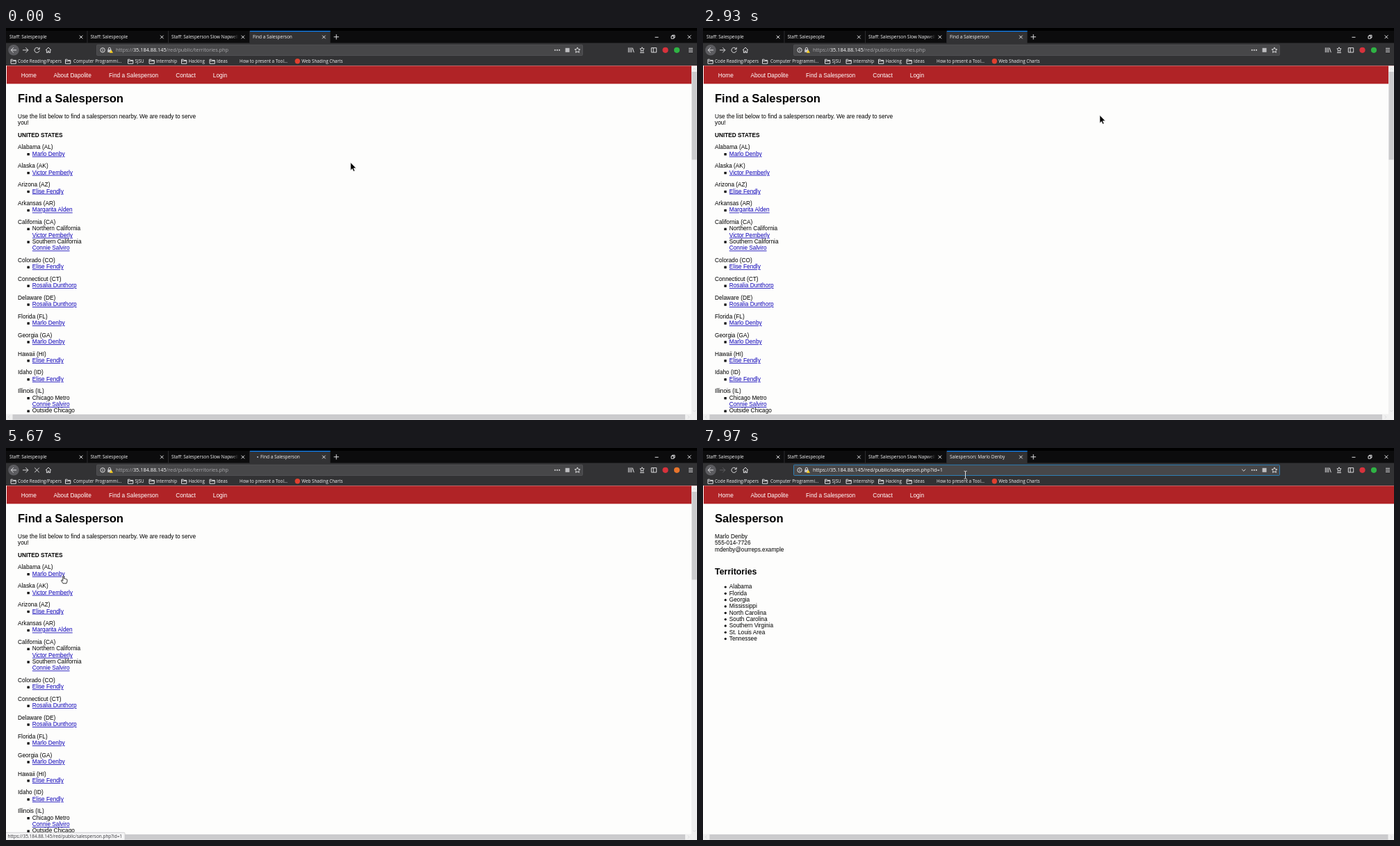
An HTML page that plays this animation: 994 by 564 pixels, repeating every 8000 ms.

```html
<!DOCTYPE html>
<html lang="en">
<head>
<meta charset="utf-8">
<title>Find a Salesperson</title>
<style>
html, body { margin: 0; width: 100%; height: 100%; overflow: hidden; background: #000; }
svg { display: block; width: 100vw; height: 100vh; }
text { white-space: pre; }
.page { font-family: "Liberation Sans", Arial, sans-serif; font-size: 8.28px; }
.ui { font-family: "Open Sans", "Noto Sans", sans-serif; font-size: 6.5px; fill: #f4f4f5; }
.link { fill: #0c00b8; text-decoration: underline; }
.bold { font-weight: bold; }
.h1 { font-weight: bold; font-size: 16.57px; }
.h2 { font-weight: bold; font-size: 12.42px; }
.line { fill: none; stroke: #dcdcde; stroke-width: 1; }
</style>
</head>
<body>
<svg id="stage" viewBox="0 0 994 564" preserveAspectRatio="none">
  <defs>
    <linearGradient id="fade" gradientUnits="userSpaceOnUse" x1="322" x2="335" y1="0" y2="0">
      <stop offset="0" stop-color="#f4f4f5"/>
      <stop offset="1" stop-color="#f4f4f5" stop-opacity="0"/>
    </linearGradient>
    <clipPath id="view"><rect y="54" width="994" height="501.5"/></clipPath>
  </defs>
</svg>
<script>
const NS = 'http://www.w3.org/2000/svg';
const LOOP = 8000;
const HOVER = 4480, CLICK = 5450, LOADED = 5760, SETTLED = 6080;
const IN_BAR = 6300, FOCUS = 6500, CARET = 7050, BLINK = 530;
const LINE = 9.32, GAP = 8.28;

const stage = document.getElementById('stage');

function add(parent, tag, attrs = {}, text) {
  const node = document.createElementNS(NS, tag);
  for (const key in attrs) node.setAttribute(key, attrs[key]);
  if (text !== undefined) node.textContent = text;
  parent.appendChild(node);
  return node;
}
const group = (parent, attrs) => add(parent, 'g', attrs);
const rect = (parent, x, y, width, height, fill) => add(parent, 'rect', { x, y, width, height, fill });
const dot = (parent, cx, cy, r, fill) => add(parent, 'circle', { cx, cy, r, fill });
const path = (parent, d, attrs) => add(parent, 'path', { d, class: 'line', ...attrs });
const label = (parent, x, y, text, attrs) => add(parent, 'text', { x, y, ...attrs }, text);
const show = (node, on) => node.setAttribute('visibility', on ? 'visible' : 'hidden');

/* browser frame */
rect(stage, 0, 0, 994, 564, '#000');
rect(stage, 0, 4, 994, 18, '#0c0c0d');
rect(stage, 0, 21.5, 994, 33, '#323234');
const ui = group(stage, { class: 'ui' });
const tabHover = rect(ui, 234, 4, 116.5, 17.5, '#2a2a2d');
rect(ui, 351, 4, 115.5, 18, '#323234');
rect(ui, 351, 4, 115.5, 1.2, '#0a84ff');
for (const x of [117, 233.6, 350.5]) rect(ui, x - .4, 4, .7, 17.5, '#38383d');
label(ui, 5, 15.4, 'Staff: Salespeople');
label(ui, 121.5, 15.4, 'Staff: Salespeople');
label(ui, 238, 15.4, 'Staff: Salesperson Slow Napwell', { fill: 'url(#fade)' });
const title = label(ui, 355, 15.4, '');
const throbber = dot(ui, 362, 13, .9, '#c8d4e4');

const cross = (x, y, r, attrs) => path(ui, `M${x - r} ${y - r}l${2 * r} ${2 * r}m0 ${-2 * r}l${-2 * r} ${2 * r}`, attrs);
for (const x of [108, 224.3, 340.8, 457.3]) cross(x, 13, 2.3);
path(ui, 'M471.5 12.8h7.4M475.2 9.1v7.4');
path(ui, 'M933.5 13.3h5', { 'stroke-width': .8 });
path(ui, 'M957 11.6h3.6v3.6H957zM958.3 11.4v-1.1h3.7V14h-1.2', { 'stroke-width': .7 });
cross(983, 12.8, 2.4, { 'stroke-width': .8 });

/* toolbar */
dot(ui, 11, 31.8, 7.8, '#5c5c60');
path(ui, 'M15 31.8H7.3M10.8 28.2L7.2 31.8l3.6 3.6', { 'stroke-width': 1.1 });
const forward = path(ui, 'M24 31.8h7.7M28.3 28.2l3.6 3.6-3.6 3.6', { 'stroke-width': 1.1 });
const reload = path(ui, 'M47.6 29.9a3.6 3.6 0 1 0 .5 2.6M48.2 27.8v2.7h-2.7', { 'stroke-width': 1.1 });
const stop = cross(44.5, 31.8, 3.3, { 'stroke-width': 1.1 });
const halfStop = path(ui, 'M41.5 28.8l6 6', { stroke: '#77777a', opacity: .8 });
path(ui, 'M57 32l4-4 4 4M58.4 31.5v4h1.9v-2.4h1.5v2.4h1.9v-4', { 'stroke-width': .9 });

const bar = add(ui, 'rect', { x: 130.5, y: 24.3, width: 699, height: 15.2, rx: 1, fill: '#474749' });
add(ui, 'circle', { cx: 139, cy: 31.8, r: 3.2, class: 'line', 'stroke-width': .7 });
path(ui, 'M139 31.2v2.2M139 29.8v.8', { 'stroke-width': .8 });
rect(ui, 146.2, 31, 5.4, 4, '#c4c4c6');
path(ui, 'M147.3 31v-1.2a1.6 1.6 0 0 1 3.2 0V31', { stroke: '#c4c4c6', 'stroke-width': .9 });
add(ui, 'path', { d: 'M151.4 31.4l2.6 4.3h-5.2z', fill: '#ffd21f' });

const marked = rect(ui, 158, 27, 187.5, 10, '#0a78d7');
const url = label(ui, 158, 34.4, '', { style: 'font-size:7.32px' });
const scheme = add(url, 'tspan', {}, 'https://');
add(url, 'tspan', { fill: '#f9f9fa' }, '35.184.88.145');
const route = add(url, 'tspan');
const caret = rect(ui, 346, 27.5, .7, 9, '#f9f9fa');

const chevron = path(ui, 'M775.2 30.6l2.6 2.6 2.6-2.6', { 'stroke-width': 1.1 });
for (const x of [789.8, 792.9, 796]) dot(ui, x, 31.8, 1.05, '#dcdcde');
rect(ui, 804.6, 28.8, 6, 6, '#bdbdc0');

function star(cx, cy, r) {
  let d = '';
  for (let i = 0; i < 10; i++) {
    const a = Math.PI * (i / 5 - .5), q = i % 2 ? r * .48 : r;
    d += `${i ? 'L' : 'M'}${cx + q * Math.cos(a)} ${cy + q * Math.sin(a)}`;
  }
  path(ui, d + 'Z', { 'stroke-width': .8 });
}
star(822, 32, 4.1);
star(915, 31, 3.3);
path(ui, 'M895.4 28.2v7M897.6 28.2v7M899.8 28.2v7M901.3 28.6l2 6.6', { 'stroke-width': .9 });
path(ui, 'M912 35.5h6', { 'stroke-width': .9 });
path(ui, 'M928.3 28.6h7.4v6.4h-7.4zM931.2 28.6V35', { 'stroke-width': .9 });
dot(ui, 948.5, 31.8, 4.1, '#d8323c');
const badge = dot(ui, 965, 31.8, 4.1, '#2fb344');
path(ui, 'M982 29.3h6M982 31.8h6M982 34.3h6', { 'stroke-width': .9 });

/* bookmarks */
const marks = [
  [17, 'Code Reading/Papers'], [97, 'Computer Programmi...'], [185.5, 'SJSU'],
  [216, 'Internship'], [262.5, 'Hacking'], [303, 'Ideas']
];
const small = { style: 'font-size:6.3px' };
for (const [x, name] of marks) {
  const left = name.startsWith('Comp') ? x - 11.5 : x - 10;
  path(ui, `M${left} 45.2h2.6l1 1.2h3.7v4.8H${left}zM${left} 47.4h7.3`, { 'stroke-width': .7 });
  label(ui, x, 50.2, name, small);
}
label(ui, 336, 50.2, 'How to present a Tool...', small);
dot(ui, 419.3, 47.8, 3.7, '#e0402f');
label(ui, 425.3, 50.2, 'Web Shading Charts', small);

/* page */
rect(stage, 0, 54, 994, 510, '#fdfdfc');
rect(stage, 1, 54.3, 993, 26, '#b02326');
const page = group(stage, { class: 'page', 'clip-path': 'url(#view)' });
const menu = [[21.7, 'Home'], [68.5, 'About Dapolite'], [148, 'Find a Salesperson'], [244.3, 'Contact'], [297.8, 'Login']];
for (const [x, name] of menu) label(page, x, 71.2, name, { fill: '#fff' });

const [MD, VP, EF, MA, CS, RD] = ['Marlo Denby', 'Victor Pemberly', 'Elise Fendly',
  'Margarita Alden', 'Connie Salviro', 'Rosalia Dunthorp'];
const states = [
  ['Alabama (AL)', MD], ['Alaska (AK)', VP], ['Arizona (AZ)', EF], ['Arkansas (AR)', MA],
  ['California (CA)', ['Northern California', VP], ['Southern California', CS]],
  ['Colorado (CO)', EF], ['Connecticut (CT)', RD], ['Delaware (DE)', RD], ['Florida (FL)', MD],
  ['Georgia (GA)', MD], ['Hawaii (HI)', EF], ['Idaho (ID)', EF],
  ['Illinois (IL)', ['Chicago Metro', CS], ['Outside Chicago', RD]]
];

const list = group(page);
label(list, 17, 107.2, 'Find a Salesperson', { class: 'h1' });
label(list, 17, 129.9, 'Use the list below to find a salesperson nearby. We are ready to serve');
label(list, 17, 139.2, 'you!');
label(list, 17, 156.8, 'UNITED STATES', { class: 'bold' });
let y = 174.4;
for (const [state, ...areas] of states) {
  label(list, 17, y, state);
  for (const area of areas) {
    y += LINE;
    rect(list, 30.5, y - 3.7, 3.3, 3.3, '#000');
    const [place, person] = Array.isArray(area) ? area : [null, area];
    if (place) {
      label(list, 37.8, y, place);
      y += LINE;
    }
    label(list, 37.8, y, person, { class: 'link' });
  }
  y += LINE + GAP;
}

const profile = group(page);
label(profile, 17, 107.2, 'Salesperson', { class: 'h1' });
[MD, '555-014-7726', 'mdenby@ourreps.example'].forEach((s, i) => label(profile, 17, 129.9 + i * LINE, s));
label(profile, 17, 181.5, 'Territories', { class: 'h2' });
['Alabama', 'Florida', 'Georgia', 'Mississippi', 'North Carolina', 'South Carolina',
  'Southern Virginia', 'St. Louis Area', 'Tennessee'].forEach((s, i) => {
  const base = 202.4 + i * LINE;
  dot(profile, 32.3, base - 2.4, 1.6, '#000');
  label(profile, 37.8, base, s);
});

/* scroll bars */
const arrow = (parent, d) => path(parent, d, { stroke: '#505050', 'stroke-width': 1 });
rect(stage, 0, 555.5, 994, 8.5, '#f0f0f0');
const thumb = rect(stage, 9.5, 556, 967.5, 7.6, '#cbcbcd');
arrow(stage, 'M5.4 557.6l-2 2.1 2 2.1');
const rightArrow = arrow(stage, 'M980.8 557.6l2 2.1-2 2.1');
const side = group(stage);
rect(side, 986, 54.3, 8, 509.7, '#f0f0f0');
rect(side, 986.5, 63, 7.2, 126.5, '#cbcbcd');
arrow(side, 'M988.3 60l2-2 2 2');
arrow(side, 'M988.3 550l2 2 2-2');

/* link address */
const status = group(stage, { class: 'ui' });
add(status, 'rect', { x: -1, y: 553.3, width: 172, height: 12, rx: 1, fill: '#f4f4f5', stroke: '#c4c4c6', 'stroke-width': .7 });
label(status, 2.5, 561.3, 'https://35.184.88.145/red/public/salesperson.php?id=1', { fill: '#38383d', style: 'font-size:6.45px' });

/* pointers, each with its hot spot at 0,0 */
const pointer = group(stage);
const shapes = {
  arrow: path(pointer, 'M0 0V11.2L2.5 8.9 4.2 12.8 6.1 12 4.4 8.2H8Z', { style: 'fill:#000;stroke:#fff;stroke-width:.6' }),
  hand: path(pointer, 'M-.8 .6Q0-.6 .8 .6V4.2Q1.8 3.4 2.5 4.5 3.5 3.9 4 5 5.4 4.6 5.4 6V8.2L4.4 11H-.6L-3 7.4Q-3.2 5.8-2 6.2L-.8 7.4Z',
    { style: 'fill:#fff;stroke:#000;stroke-width:.8' }),
  beam: path(pointer, 'M-2-5.6Q-.2-5.6 0-4.8 .2-5.6 2-5.6M0-5V5M-2 5.6Q-.2 5.6 0 4.8 .2 5.6 2 5.6', { stroke: '#d0d0d2', 'stroke-width': .9 })
};

// time, x, y
const route2d = [
  [0, 495.7, 193.5], [730, 495.7, 193.5], [1160, 495.7, 196.5], [1600, 495.7, 196.5], [1700, 495.7, 197.7],
  [1950, 495.7, 197.7], [2650, 585, 132], [2930, 570.8, 125.5], [3150, 556, 130], [3900, 105, 205],
  [4170, 92.3, 197.5], [4520, 82.6, 183.8], [5690, 82.6, 183.8], [6000, 350.5, 16.3],
  [6120, 350.8, 16], [6400, 377.5, 38.8], [LOOP, 377.5, 38.8]
];

function place(t) {
  const i = route2d.findIndex(k => k[0] > t);
  const [t0, x0, y0] = route2d[i - 1], [t1, x1, y1] = route2d[i];
  const u = (t - t0) / (t1 - t0), e = u * u * (3 - 2 * u);
  return [x0 + (x1 - x0) * e, y0 + (y1 - y0) * e];
}

function draw(t) {
  const loaded = t >= LOADED, loading = t >= CLICK && !loaded, focus = t >= FOCUS;
  const hover = t >= HOVER && !loaded;
  const [px, py] = place(t);

  show(list, !loaded);
  show(side, !loaded);
  show(profile, loaded);
  show(status, hover);
  thumb.setAttribute('width', loaded ? 976 : 967.5);
  rightArrow.setAttribute('transform', `translate(${loaded ? 8.5 : 0})`);

  title.textContent = loaded ? 'Salesperson: ' + MD : 'Find a Salesperson';
  title.setAttribute('x', loading ? 366 : 355);
  show(throbber, loading);
  throbber.setAttribute('cx', 359.5 + 2.5 * Math.cos((t - 5670) / 180));
  show(tabHover, py < 21 && px < 351);

  forward.setAttribute('opacity', loaded ? .25 : 1);
  show(reload, t < CLICK || t >= SETTLED);
  show(stop, loading);
  show(halfStop, loaded && t < SETTLED);
  badge.setAttribute('fill', loading ? '#e8742c' : '#2fb344');

  route.textContent = '/red/public/' + (loaded ? 'salesperson.php?id=1' : 'territories.php');
  for (const part of [scheme, route]) part.setAttribute('fill', focus ? '#f9f9fa' : '#a9a9ac');
  bar.setAttribute('stroke', focus ? '#2f7fb5' : '#505053');
  show(marked, focus && t < CARET);
  show(caret, t >= CARET && t < CARET + BLINK);
  chevron.setAttribute('opacity', t >= IN_BAR ? 1 : t >= 5930 ? .3 : 0);

  const kind = hover && t < LOADED ? 'hand' : t >= IN_BAR ? 'beam' : 'arrow';
  for (const name in shapes) show(shapes[name], name === kind);
  pointer.setAttribute('transform', `translate(${px} ${py})`);
}

const start = performance.now();
function tick() {
  draw((performance.now() - start) % LOOP);
  requestAnimationFrame(tick);
}
tick();
</script>
</body>
</html>
```
